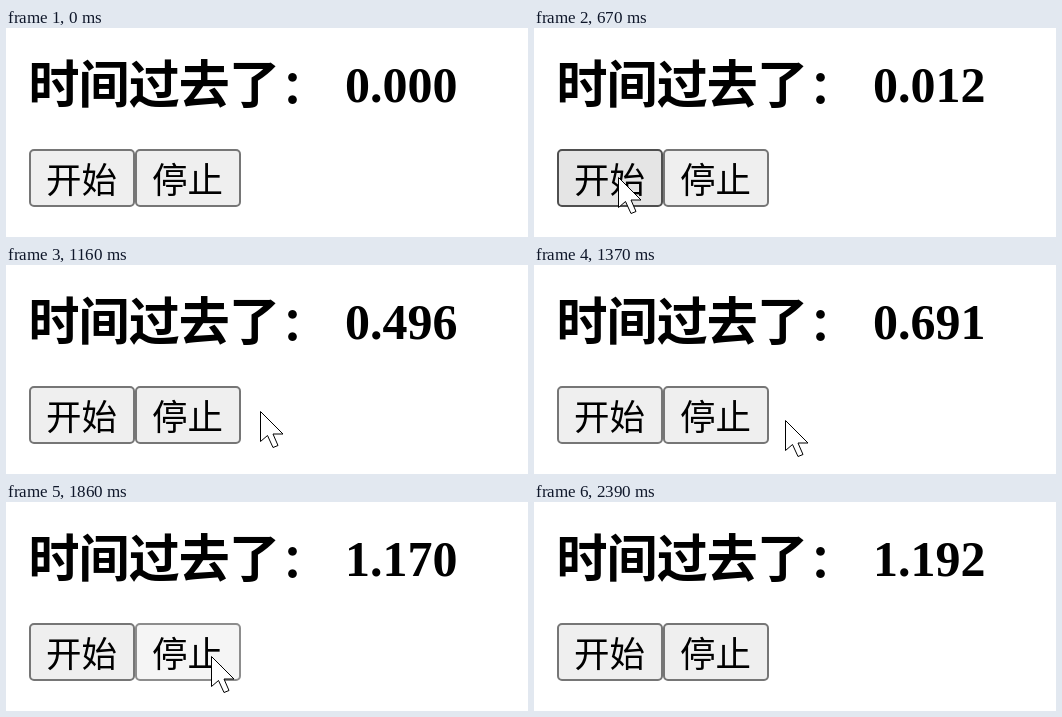
Animation, 522 px wide and 209 px high, one loop 2850 ms. Source, as an HTML page:

```html
<!DOCTYPE html>
<html lang="zh-CN">
<head>
<meta charset="utf-8">
<style>
  html, body { margin: 0; width: 100%; height: 100%; overflow: hidden; background: #fff; }
  svg { display: block; width: 522px; height: 209px; }
  .title { font: bold 51px "Noto Sans CJK SC", "Noto Sans CJK", sans-serif; letter-spacing: -.9px; }
  .colon { font-size: 46px; }
  .count { font: bold 50px "Liberation Serif", serif; }
  .label { font: 35.5px "Noto Sans CJK SC", "Noto Sans CJK", sans-serif; }
  rect { stroke-width: 2; }
  .idle { fill: #efefef; stroke: #767676; }
  .hover { fill: #e5e5e5; stroke: #4f4f4f; }
  .active { fill: #f5f5f5; stroke: #8d8d8d; }
</style>
</head>
<body>
<svg viewBox="0 0 522 209">
  <text class="title" x="22.5" y="75">时间过去了<tspan class="colon" dx="2">：</tspan></text>
  <text class="count" id="count" x="339" y="74">0.000</text>
  <rect id="start" x="24" y="122" width="104" height="56" rx="4"/>
  <rect id="stop" x="130" y="122" width="104" height="56" rx="4"/>
  <text class="label" x="40" y="165">开始</text>
  <text class="label" x="146" y="165">停止</text>
  <path id="cursor" d="M-.5 .5V30.5L6.5 24.5L12 36.5L17 34.5L12 23H22Z" fill="#fff" stroke="#000"/>
</svg>
<script>
const LOOP = 2850, ENTER = 250, LEAVE = 2390, LAG = 70, PRESS = 140;
const $ = id => document.getElementById(id);

// Resting points of the pointer: time, x, y
const path = [
  [ENTER, 110, 200], [460, 85, 149], [740, 85, 149], [950, 257, 137],
  [1370, 252, 155], [1650, 206, 154], [2115, 206, 154], [LEAVE, 532, 197]
];
// Stopwatch readings: time, milliseconds
const counts = [[658, 0], [670, 12], [950, 301], [1370, 691], [1650, 962], [1882, 1192]];
const buttons = [{ id: "start", left: 23, click: 670 }, { id: "stop", left: 129, click: 1930 }];

const linear = p => p;
const smooth = p => p * p * (3 - 2 * p);

function sample(keys, t, ease) {
  const i = keys.findIndex(k => k[0] > t);
  const b = keys.at(i), a = i > 0 ? keys[i - 1] : b;
  const p = a === b ? 0 : ease((t - a[0]) / (b[0] - a[0]));
  return a.slice(1).map((v, j) => v + (b[j + 1] - v) * p);
}

const pointer = t => sample(path, t, smooth).map(Math.round);

// The screen refreshes in discrete ticks
function tick(t) {
  const [base, step] = t < 2130 ? [ENTER, 70] : [2130, 65];
  return base + step * Math.floor((t - base) / step);
}

// Hover feedback trails the pointer by one refresh
function stateOf({ left, click }, t) {
  if (t >= click - PRESS && t < click) return "active";
  const [x, y] = pointer(t - LAG);
  return x >= left && x < left + 106 && y >= 121 && y < 179 ? "hover" : "idle";
}

function draw(t) {
  for (const b of buttons) $(b.id).setAttribute("class", stateOf(b, t));
  $("count").textContent = (sample(counts, t, linear)[0] / 1000).toFixed(3);
  $("cursor").setAttribute("transform", `translate(${pointer(t)})`);
  $("cursor").style.display = t >= ENTER && t < LEAVE ? "" : "none";
}

const begin = performance.now();
function frame() {
  draw(tick((performance.now() - begin) % LOOP));
  requestAnimationFrame(frame);
}
frame();
</script>
</body>
</html>
```
